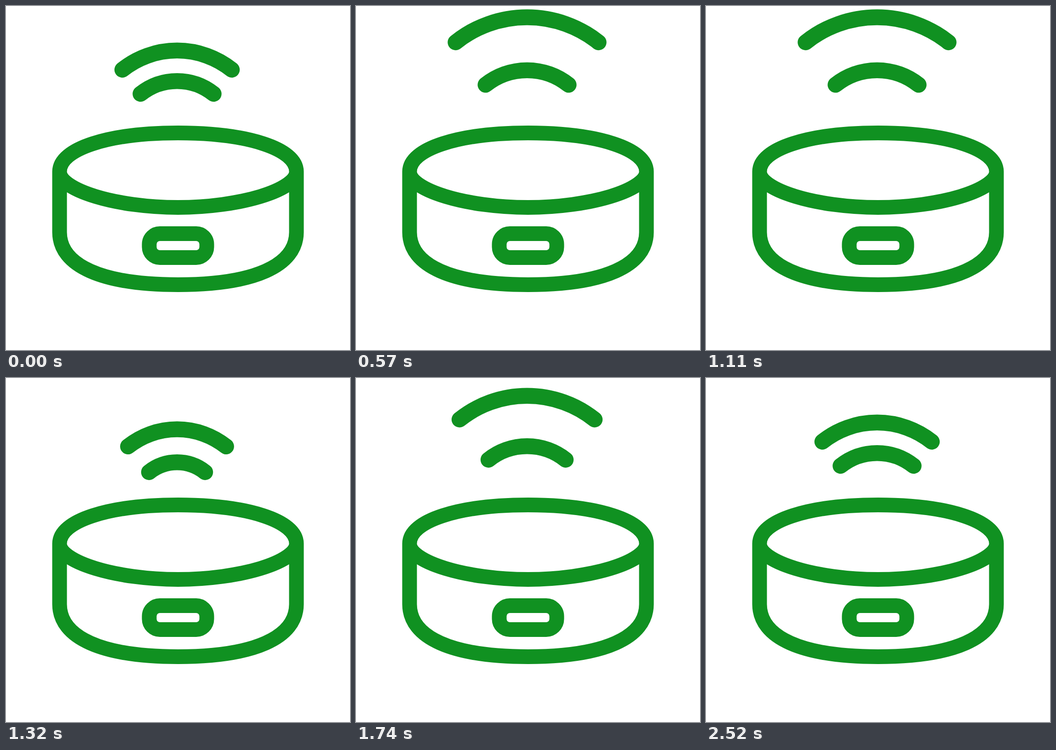
Animation of 748x748 px, one loop 2550 ms. Source, as an HTML page:

```html
<!DOCTYPE html>
<html lang="en">
<head>
<meta charset="utf-8">
<title>Smart sensor</title>
<style>
  html, body { margin: 0; height: 100%; overflow: hidden; background: #fff; }
  svg { display: block; width: 100vw; height: 100vh; }
  path, rect { fill: none; stroke: #109121; stroke-width: 32; }
  .wave { stroke-width: 34.5; stroke-linecap: round; }
</style>
</head>
<body>
<svg viewBox="0 0 748 748">
  <path id="body"/>
  <rect id="port" height="52" rx="23"/>
  <path id="outer" class="wave"/>
  <path id="inner" class="wave"/>
</svg>
<script>
const LOOP = 2550, FRAME = 30, START = 300, BEAT = 540, BEATS = 3;
const MID = 374, WAVE_MID = 372;

// Change of half-width and height per unit of push and of recoil
const waves = {
  outer: { half: 119, y: 138.5, push: [37, -60.5], recoil: [0.67, -0.56] },
  inner: { half: 79.5, y: 191, push: [11, -20], recoil: [1, -0.74] }
};

const pushKeys = [[0, 0], [150, 0.21], [305, 1.1], [480, 0]];
const recoilKeys = [[300, 0], [480, -18.5], [600, 0]];
const settleKeys = [[300, 0], [480, -18.5], [725, 28], [1140, 0]];

// Eases in and out between [time, value] points, zero outside them
function ease(points, time) {
  const next = points.findIndex(point => point[0] > time);
  if (next <= 0) return 0;
  const [t0, a] = points[next - 1], [t1, b] = points[next];
  const u = (time - t0) / (t1 - t0);
  return a + (b - a) * u * u * (3 - 2 * u);
}

const bump = (time, length) =>
  time > 0 && time < length ? Math.sin(Math.PI * time / length) ** 2 : 0;

function poseAt(time) {
  const pose = { squash: 0, hop: 0, push: 0, recoil: 0 };
  for (let beat = 0; beat < BEATS; beat++) {
    const phase = time - START - beat * BEAT;
    pose.squash += bump(phase, 180);
    pose.hop += 9 * bump(phase, 240);
    pose.push += ease(pushKeys, phase);
    pose.recoil += ease(beat < BEATS - 1 ? recoilKeys : settleKeys, phase);
  }
  return pose;
}

// Curve from the left wall through the middle to the right wall
function bow(wide, side, middle, fullness) {
  const y = side + (middle - side) * fullness, x = wide * fullness;
  return `M${MID - wide} ${side}
    C${MID - wide} ${y} ${MID - x} ${middle} ${MID} ${middle}
    C${MID + x} ${middle} ${MID + wide} ${y} ${MID + wide} ${side}`;
}

const set = (id, attributes) => {
  for (const name in attributes) document.getElementById(id).setAttribute(name, attributes[name]);
};

function drawBody(squash) {
  const grow = 7.6 * squash, wide = 257.5 + grow, rim = 360 + 15 * squash;
  set("body", {
    d: bow(wide, rim, rim - 84, 0.59) + bow(wide, rim, rim + 78, 0.52)
      + bow(wide, 492, 606, 0.64) + `V${rim}M${MID - wide} 492V${rim}`
  });
  set("port", { x: 311.5 - grow, y: 495 + 8 * squash, width: 125 + 2 * grow });
}

function drawWave(id, { push, recoil, hop }) {
  const wave = waves[id];
  const offset = axis => wave.push[axis] * push + wave.recoil[axis] * recoil;
  const half = wave.half + offset(0), y = wave.y + offset(1) - hop;
  const radius = half * 1.604;
  set(id, { d: `M${WAVE_MID - half} ${y}A${radius} ${radius} 0 0 1 ${WAVE_MID + half} ${y}` });
}

function draw() {
  const time = Math.floor(performance.now() % LOOP / FRAME) * FRAME;
  const pose = poseAt(time);
  drawBody(pose.squash);
  for (const id in waves) drawWave(id, pose);
  requestAnimationFrame(draw);
}
draw();
</script>
</body>
</html>
```
